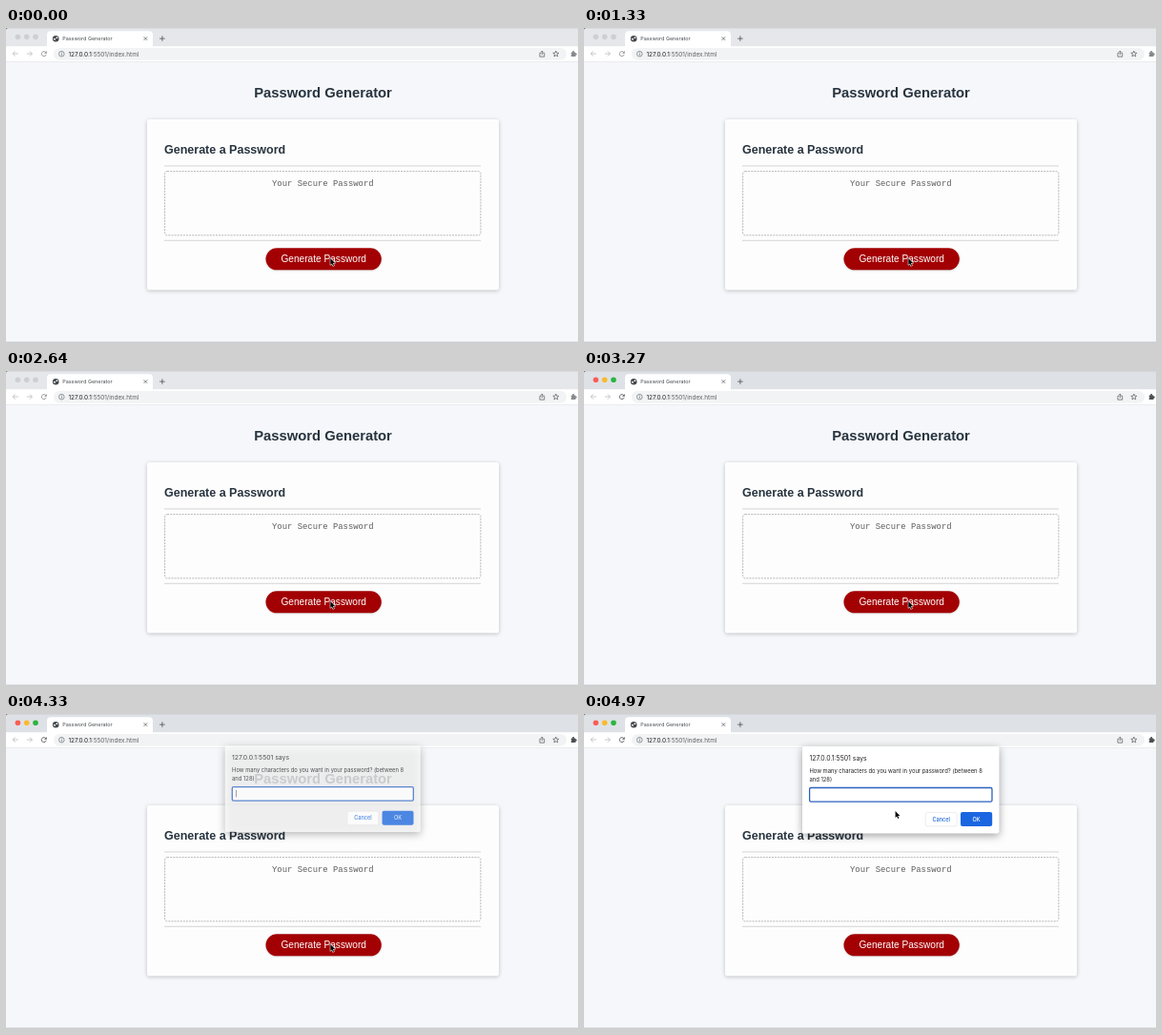
An HTML page with a canvas for the animation above (5 s loop, 600 by 331 pixels).

```html
<!DOCTYPE html>
<html lang="en">
<head>
<meta charset="utf-8">
<title>Password Generator</title>
<style>
  html, body { margin: 0; width: 100%; height: 100%; overflow: hidden; background: #f5f7fa; }
  canvas { display: block; width: 600px; height: 331px; }
</style>
</head>
<body>
<canvas id="stage"></canvas>
<script>
const W = 600, H = 331, LOOP = 5000;
const FOCUS = 2790, OPEN = 4280, CARET_OFF = 4800;
const MOVE = { from: [340.3, 242], to: [326.6, 102], start: 4480, end: 4920 };
const UI = 'Inter, Roboto, sans-serif';
const SANS = '"Liberation Sans", Arial, sans-serif';
const MONO = '"Liberation Mono", "Courier New", monospace';

const canvas = document.getElementById('stage');
const c = canvas.getContext('2d');
const dpr = window.devicePixelRatio || 1;
canvas.width = W * dpr;
canvas.height = H * dpr;

const clamp = v => Math.min(1, Math.max(0, v));
const easeInOut = p => p * p * (3 - 2 * p);

function rect(x, y, w, h, color) {
  c.fillStyle = color;
  c.fillRect(x, y, w, h);
}

function box(x, y, w, h, r, fill, stroke, width = 1) {
  c.beginPath();
  c.roundRect(x, y, w, h, r);
  if (fill) { c.fillStyle = fill; c.fill(); }
  if (stroke) { c.strokeStyle = stroke; c.lineWidth = width; c.stroke(); }
}

function dot(x, y, r, color) {
  c.beginPath();
  c.arc(x, y, r, 0, Math.PI * 2);
  c.fillStyle = color;
  c.fill();
}

function path(points, color, width = 0.8) {
  c.beginPath();
  points.forEach(([x, y], i) => i ? c.lineTo(x, y) : c.moveTo(x, y));
  c.strokeStyle = color;
  c.lineWidth = width;
  c.stroke();
}

function text(str, x, y, font, color, align = 'left') {
  c.font = font;
  c.fillStyle = color;
  c.textAlign = align;
  c.fillText(str, x, y);
  return c.measureText(str).width;
}

function shadow(color, blur, dy) {
  c.shadowColor = color;
  c.shadowBlur = blur * dpr;
  c.shadowOffsetY = dy * dpr;
}

const noShadow = () => shadow('transparent', 0, 0);

function globe(x, y) {
  dot(x, y, 3.3, '#45494d');
  c.fillStyle = '#f4f5f6';
  c.beginPath();
  c.ellipse(x - 1.3, y + 0.5, 1.2, 0.8, 0.5, 0, 7);
  c.ellipse(x + 1.2, y - 1, 1.1, 0.8, -0.4, 0, 7);
  c.fill();
}

function arrow(x, dir, color) {
  path([[x - 2.8, 27], [x + 2.8, 27]], color, 0.75);
  path([[x + dir * 0.3, 24.4], [x + dir * 2.8, 27], [x + dir * 0.3, 29.6]], color, 0.75);
}

function reload(x, y, color) {
  c.beginPath();
  c.arc(x, y, 2.5, 0.3, 5.5);
  c.strokeStyle = color;
  c.lineWidth = 0.8;
  c.stroke();
  c.beginPath();
  c.moveTo(x + 2.9, y - 3);
  c.lineTo(x + 2.9, y - 0.3);
  c.lineTo(x + 0.3, y - 0.3);
  c.fillStyle = color;
  c.fill();
}

function star(x, y, color) {
  const points = [];
  for (let i = 0; i <= 10; i++) {
    const r = i % 2 ? 1.4 : 3.2, a = i * Math.PI / 5 - Math.PI / 2;
    points.push([x + r * Math.cos(a), y + r * Math.sin(a)]);
  }
  path(points, color, 0.7);
}

function share(x, y, color) {
  path([[x - 1, y - 0.9], [x - 2.4, y - 0.9], [x - 2.4, y + 3],
        [x + 2.4, y + 3], [x + 2.4, y - 0.9], [x + 1, y - 0.9]], color, 0.7);
  path([[x, y + 1.2], [x, y - 3]], color, 0.7);
  path([[x - 1.4, y - 1.7], [x, y - 3.1], [x + 1.4, y - 1.7]], color, 0.7);
}

function puzzle(x, y, color) {
  box(x - 2.6, y - 1.6, 4.8, 4.6, 0.6, color);
  dot(x - 0.2, y - 2, 1.1, color);
  dot(x + 2.4, y + 0.6, 1.1, color);
  dot(x - 2.7, y + 0.8, 0.8, '#fff');
}

function chrome(active) {
  const ink = active ? '#4b4f54' : '#85898d';
  const faint = '#b3b6ba';
  rect(0, 0, W, 20, active ? '#dee1e6' : '#e5e7eb');
  rect(0, 0, W, 0.6, active ? '#cfd2d6' : '#d6d8dc');
  rect(0, 0, 1.2, 1.2, '#777b82');

  const lights = active ? ['#fb5d55', '#f9ba2f', '#2bb540'] : ['#cdcfd2', '#cdcfd2', '#cdcfd2'];
  lights.forEach((color, i) => dot(12.4 + i * 9.3, 9.3, 2.8, color));

  box(43, 3.2, 111, 18, [4, 4, 0, 0], '#fff');
  globe(52.2, 11.2);
  text('Password Generator', 59.2, 13.2, '5.45px ' + UI, '#45494d');
  path([[144.6, 9.3], [148.2, 12.9]], '#55595e', 0.75);
  path([[148.2, 9.3], [144.6, 12.9]], '#55595e', 0.75);
  path([[161.1, 11.1], [166.7, 11.1]], '#4b4f54');
  path([[163.9, 8.3], [163.9, 13.9]], '#4b4f54');

  rect(0, 19.2, W, 16.3, '#fff');
  arrow(10, -1, faint);
  arrow(24.6, 1, faint);
  reload(39.8, 27.1, ink);
  box(50, 20.9, 538, 12.8, 6.4, '#f1f3f4');

  c.beginPath();
  c.arc(58.3, 27.2, 2.8, 0, 7);
  c.strokeStyle = '#5f6368';
  c.lineWidth = 0.65;
  c.stroke();
  rect(57.95, 26.7, 0.7, 2, '#5f6368');
  rect(57.95, 25.4, 0.7, 0.8, '#5f6368');

  const font = '6.4px ' + UI;
  const hostWidth = text('127.0.0.1', 65.5, 29.5, font, '#1f2226');
  text(':5501/index.html', 65.5 + hostWidth, 29.5, font, '#5c6065');
  share(562.3, 27.2, '#53575c');
  star(576.8, 27.3, '#53575c');
  puzzle(595.3, 27, ink);
  rect(0, 35.2, W, 0.6, '#e1e3e6');
}

function page() {
  rect(0, 35, W, H - 35, '#f5f7fa');
  text('Password Generator', 332.5, 73.4, 'bold 14.8px ' + SANS, '#28343f', 'center');

  shadow('rgba(0,0,0,0.22)', 4, 1);
  box(148, 96, 369, 179.3, 2.2, '#fdfdfd');
  noShadow();
  text('Generate a Password', 166, 131.8, 'bold 12.5px ' + SANS, '#28343f');
  rect(166, 144.5, 332, 0.9, '#cfcfcf');
  rect(166, 222.8, 332, 0.9, '#cfcfcf');

  c.setLineDash([2, 1.1]);
  box(166.6, 150.6, 331.3, 67.2, 2.5, null, '#b4b4b4', 0.95);
  c.setLineDash([]);
  text('Your Secure Password', 332.3, 166, '8.9px ' + MONO, '#5c5c5c', 'center');

  shadow('rgba(0,0,0,0.2)', 2, 0.5);
  box(272.5, 231.3, 121.3, 23, 11.5, '#a30003');
  noShadow();
  text('Generate Password', 333.2, 246.4, '10.15px ' + SANS, '#fff', 'center');
  rect(0, 329.6, W, 1.4, '#c9cbce');
}

function dialog(t) {
  const p = clamp((t - OPEN) / 100);
  if (!p) return;
  const shown = 1 - (1 - p) ** 2;
  const scale = 1 - 0.03 * (1 - shown);
  c.save();
  c.globalAlpha = shown;
  c.translate(332.2, 80 - 4 * (1 - shown));
  c.scale(scale, scale);
  c.translate(-332.2, -80);

  shadow('rgba(0,0,0,0.36)', 9, 2.5);
  box(229, 34, 206.5, 91.4, 2, '#fff');
  noShadow();
  text('127.0.0.1:5501 says', 236.4, 48.5, '6.9px ' + UI, '#202124');
  text('How many characters do you want in your password? (between 8', 236.4, 62.2, '5.87px ' + UI, '#202124');
  text('and 128)', 236.4, 71.3, '5.87px ' + UI, '#202124');
  box(236.6, 77.5, 191.4, 14.7, 1.4, '#fff', '#2a62c0', 1.3);
  if (t < CARET_OFF) rect(240.3, 80.8, 0.6, 7.6, '#33363a');

  box(358.2, 103.3, 33, 14.6, 2, '#fff', '#dfe1e5', 0.6);
  text('Cancel', 374.7, 112.6, '500 5.6px ' + UI, '#1a67dc', 'center');
  box(395, 103, 33.2, 15, 2, '#1a66e0');
  text('OK', 411.6, 112.6, '500 5.6px ' + UI, '#fff', 'center');
  c.restore();
}

function cursor(t) {
  const p = easeInOut(clamp((t - MOVE.start) / (MOVE.end - MOVE.start)));
  const [x, y] = MOVE.from.map((v, i) => v + (MOVE.to[i] - v) * p);
  const shape = [[0, 0], [0, 6.9], [1.6, 5.4], [2.7, 8], [3.8, 7.5], [2.7, 5], [4.8, 5]];
  c.beginPath();
  shape.forEach(([dx, dy]) => c.lineTo(x + dx, y + dy));
  c.closePath();
  c.lineJoin = 'round';
  c.strokeStyle = '#fff';
  c.lineWidth = 1.1;
  c.stroke();
  c.fillStyle = '#000';
  c.fill();
  c.lineJoin = 'miter';
}

function draw(t) {
  c.setTransform(dpr, 0, 0, dpr, 0, 0);
  page();
  chrome(t >= FOCUS);
  dialog(t);
  cursor(t);
}

const start = performance.now();
function tick() {
  draw((performance.now() - start) % LOOP);
  requestAnimationFrame(tick);
}
tick();
</script>
</body>
</html>
```
